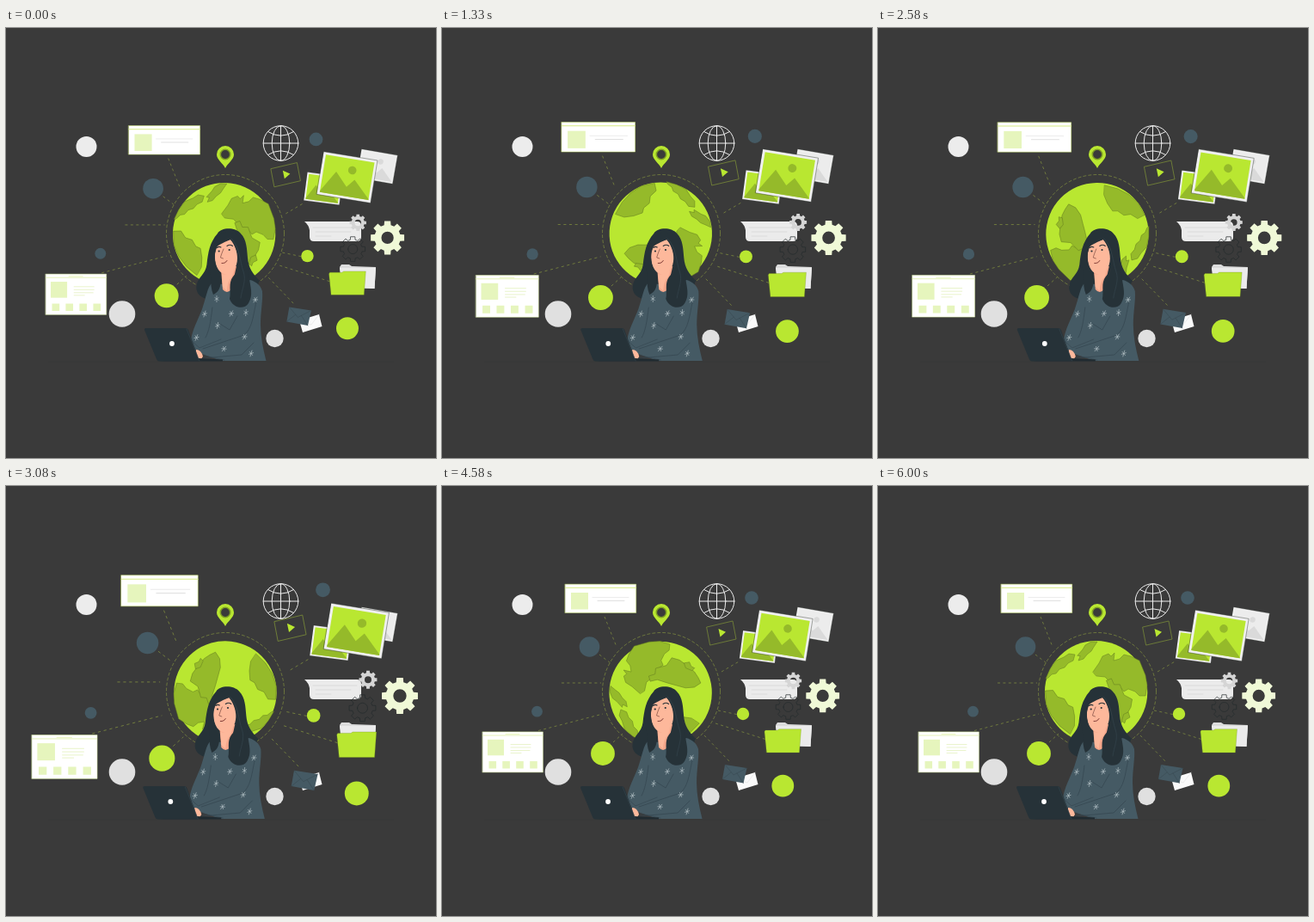
An HTML page for the animation above (6040 ms loop, 500 px wide and 500 px high).

```html
<!DOCTYPE html>
<html lang="en">
<head>
<meta charset="utf-8">
<title>Connected world</title>
<style>
  html, body { margin: 0; width: 100%; height: 100%; overflow: hidden; background: #3a3a3a; }
  svg { display: block; width: 100%; height: 100%; }
</style>
</head>
<body>
<svg viewBox="0 0 500 500" fill="none" stroke-linejoin="round" stroke-linecap="round">
  <path d="M50 388H450" stroke="#333638" stroke-width=".6"/>

  <!-- Dashed links -->
  <g id="links" stroke="#84923f" stroke-width=".7" stroke-dasharray="3 3.4" stroke-linecap="butt">
    <path d="M139 229H185M189 152L203 187M183 196L196 206M325 216L347 203M112 284.500L187 265
             M321 261L345 266M318 276L376 294.500M305 290L335 321M199 298L210 288"/>
  </g>
  <circle cx="255" cy="239" r="68.500" stroke="#84923f" stroke-width=".7" stroke-dasharray="3 3"/>

  <!-- Earth; each landmass is drawn at the turn where it is fully visible -->
  <g id="earth">
    <circle cx="253.600" cy="239.700" r="59.700" fill="#b9e731"/>
    <g id="land" fill="#95ba2a" stroke="#657f20" stroke-width=".5"></g>
  </g>

  <!-- Still items -->
  <g id="still">
    <circle cx="93.500" cy="138" r="12" fill="#ececec"/>
    <circle cx="135" cy="332.500" r="15.300" fill="#e0e0e0"/>
    <circle cx="312.500" cy="361" r="10.200" fill="#e0e0e0"/>
    <path d="M255 163C252 157 245 153 245 147A10 10 0 0 1 265 147C265 153 258 157 255 163Z" fill="#b9e731"/>
    <circle cx="255" cy="147" r="5.700" fill="#3a3a3a" stroke="#7f9f24" stroke-width="1.600"/>
    <g stroke="#ededed" stroke-width="1">
      <circle cx="319.500" cy="134" r="20.300"/>
      <ellipse cx="319.500" cy="134" rx="10.300" ry="20.300"/>
      <path d="M319.500 113.700V154.300M299.200 134H339.800M304.500 120.500Q319.500 130 334.500 120.500M304.500 147.500Q319.500 138 334.500 147.500"/>
    </g>
    <g id="greyPhoto"></g>
    <path d="M347 225H408Q413 225 413 230V243Q413 248 408 248H358Q353 248 353 243V235Q352 229 347 225Z" fill="#ebebeb"/>
    <path d="M357 232H408M360 237H401M360 242H378" stroke="#d4d4d4" stroke-width=".7"/>
    <path d="M388 278L390 275H399L402 277L430 278L428.500 303L392 302Z" fill="#dcdcdc"/>
    <path d="M388 279L430 279L428.500 303L390 301Z" fill="#ebebeb"/>
    <path d="M341 340L364 333L367.500 347L345 354Z" fill="#fafafa"/>
    <path d="M341 340L355 345L364 333" stroke="#dcdcdc" stroke-width=".5"/>
  </g>

  <!-- Pulsing items -->
  <g id="pulse">
    <g id="discs"></g>

    <rect x="143.200" y="114.200" width="82.500" height="33.300" fill="#fff" stroke="#c9e26d" stroke-width=".5"/>
    <path d="M143.500 118.300H225.500" stroke="#d6ec83" stroke-width="1"/>
    <rect x="150" y="124" width="20" height="19.500" fill="#e6f5bd"/>
    <path d="M175 129.500H217" stroke="#e4e4e4" stroke-width=".7"/>
    <path d="M181 133.500H212" stroke="#d4d4d4" stroke-width=".7"/>

    <rect x="47.200" y="285.900" width="70.200" height="47" fill="#fff" stroke="#d9eca0" stroke-width=".5"/>
    <path d="M47.500 290H117" stroke="#e2f1b2" stroke-width=".9"/>
    <path d="M74 288.500H90" stroke="#d6ec83" stroke-width=".5"/>
    <rect x="53" y="294.800" width="19" height="18.500" fill="#e6f5bd"/>
    <path d="M80 300.500H103M80 304H103M80 307.500H102M80 310.500H92" stroke="#dcecab" stroke-width=".6"/>
    <path d="M54.500 320h8.600v8.600h-8.600zM70.300 320h8.600v8.600h-8.600zM86.200 320h8.600v8.600h-8.600zM102.200 320h8.600v8.600h-8.600z" fill="#e6f5bd"/>

    <path d="M308 164L338 157L342 178L312 185Z" stroke="#809438" stroke-width=".7"/>
    <path d="M321.500 166L330 169.800L323.500 175.500Z" fill="#b9e731"/>

    <g id="greenPhotos"></g>
    <g id="gears"></g>

    <path d="M375 285.500L376 284H390L392 282.700H417.500L415.500 310H377.500Z" fill="#b9e731" stroke="#6f8b22" stroke-width=".3"/>
    <path d="M329 324L354.500 328L350.500 345.500L326 341Z" fill="#455a64"/>
    <path d="M329 324L339 336L354.500 328M326 341L336 333M350.500 345.500L343 334" stroke="#37474f" stroke-width=".5"/>
  </g>

  <!-- Woman with laptop -->
  <g id="woman">
    <path d="M246 239C250 232 266 231 273 239C280 246 280 257 281 267C282 279 287 286 295 294
             C291 300 294 307 288 314L240 315C229 317 220 309 221.500 300C223 289 232 287 233.500 275
             C235 261 237 249 246 239Z" fill="#263238"/>
    <path d="M240 296C234 301 233 313 228 327C223 340 217 350 215 363L222 377L251 387H302.500
             C299 373 296 359 296 345C296 330 299 316 298 306C296 299 291 295 284 293L263 300Z" fill="#455a64"/>
    <path d="M250 281L252 304Q257 310 262 304L268 277Z" fill="#f6a78b"/>
    <path d="M245 255C247 250 254 248 261 246C266 252 269 260 269 268C269 279 262 287 255 286.500
             C246 285 242 273 243 262Z" fill="#fdb89b"/>
    <path d="M254 286.500Q262 286 266 279L263 289Q257 296 257 306L252 301L251 286Z" fill="#fdb89b"/>
    <path d="M261 246C266 251 269 259 270 268C271 278 269 284 264 289C258 297 262 306 260 315
             C264 326 277 328 282 320C288 310 284 301 283 291C281 278 281 258 274 245
             C268 236 250 235 244 244C238 253 236 265 236 276C240 285 236 297 241 310
             C252 305 251 292 246 281C242 272 242 262 245 255C248 251 255 249 261 246Z" fill="#263238"/>
    <path d="M262 245C272 254 272 272 276 283S274 304 273 314" stroke="#37474f" stroke-width=".6"/>
    <path d="M245.500 255.500Q247.500 253.500 250 255M257 253.500Q260.500 251 263.500 253.500" stroke="#263238" stroke-width="1.100"/>
    <circle cx="247.700" cy="259.500" r="1.100" fill="#263238"/>
    <circle cx="259.700" cy="258" r="1.100" fill="#263238"/>
    <path d="M253 257Q250 264 249.500 267L252.500 268" stroke="#7a4a40" stroke-width=".7"/>
    <path d="M251 273.500Q255 274 257 270.500" stroke="#7d3934" stroke-width="1"/>

    <path d="M240 325C238 342 236 353 232 360M291 318C287 338 286 349 277 357L229 373
             M249 344L260 351L269 335M229 384L274 380L288 366" stroke="#34464f" stroke-width=".7"/>
    <path d="M215 363L225 372L250 362M230 381L254 386" stroke="#34464f" stroke-width=".6"/>
    <g id="stars" stroke="#c3cfd3" stroke-width=".55"></g>
    <path d="M221 374Q227 374 229 382L227 385L221 383Z" fill="#fdb89b"/>
    <path d="M222 384L252 385.500V387.500H177Z" fill="#202b31"/>
    <path d="M163 349H209Q211 349 212 351L225 387.500H178Q176 387.500 175 385L161 351Q160.500 349 163 349Z" fill="#263238"/>
    <path d="M210 350L225 387" stroke="#37474f" stroke-width=".6"/>
    <circle cx="193" cy="367" r="2.900" fill="#fff"/>
  </g>
</svg>

<script>
const LOOP = 6040, CYCLE = 6000, LEAD = 28;
const GREEN = '#b9e731', SHADE = '#95ba2a', SLATE = '#455a64';
const PIVOT = '254.300 239.800';
const $ = id => document.getElementById(id);
const add = (id, markup) => $(id).insertAdjacentHTML('beforeend', markup);

// [turn in degrees, outline]
const landmasses = [
  [0, 'M195 224L200 213L207 203L216 199L222 195L229 196L227 203L221 206L217 211L211 213L207 218L202 219L198 223Z'],
  [0, 'M232 197L238 190L241 185L248 181L255 181L251 187L248 192L243 196L239 201L233 203L235 198Z'],
  [0, 'M250 216L257 206L261 198L268 195L271 198L275 194L274 203L281 201L286 196L294 198L304 203L311 220L313 232L311 244L304 244L299 239L291 236L286 239L280 232L275 234L270 228L264 222L254 221Z'],
  [157, 'M264 183L279 187L292 194L303 204L310 218L302 222L294 217L286 218L279 213L273 213L267 204L263 194Z'],
  [220, 'M228 229L232 217L228 207L235 201L243 198L256 194L264 194L271 195L271 204L266 213L258 220L250 227L240 235L237 243L231 241L233 234Z'],
  [277, 'M282 206L288 205L290 210L294 212L291 215L284 212Z']
];
landmasses.forEach(([turn, d]) => add('land', `<path transform="rotate(${-turn} ${PIVOT})" d="${d}"/>`));

const disc = (x, y, r, fill) => `<circle cx="${x}" cy="${y}" r="${r}" fill="${fill}"/>`;
add('discs', disc(171.5, 187, 11.8, SLATE) + disc(360, 130, 7.8, SLATE) + disc(110.5, 262.2, 6.4, SLATE)
  + disc(350, 265, 7.2, GREEN) + disc(396.3, 348.7, 12.9, GREEN) + disc(187, 311, 13.9, GREEN));

function photo(x, y, w, turn, fill, hill) {
  const scale = w / 63;
  return `<g transform="translate(${x} ${y}) rotate(${turn}) scale(${scale})">
    <rect x="-31.500" y="-25" width="63" height="50" fill="#f0f0f0" stroke="#2f3630" stroke-width=".4"/>
    <rect x="-28.500" y="-22" width="57" height="44" fill="${fill}"/>
    <path d="M-28.500 20L-13.500 -4.500L1 11L9 1.500L28.500 21V22H-28.500Z" fill="${hill}"/>
    <circle cx="4.600" cy="-9" r="4.800" fill="${hill}"/></g>`;
}
add('greyPhoto', photo(431.5, 161, 42.5, 10, '#ececec', '#dadada'));
add('greenPhotos', photo(368.5, 187, 41.5, 7.5, GREEN, SHADE) + photo(396, 174, 63, 9.3, GREEN, SHADE));

function gear(x, y, r, hole, style) {
  const teeth = 8, step = 2 * Math.PI / teeth;
  let d = '';
  for (let i = 0; i < teeth; i++) {
    [[-.33, .77], [-.23, 1], [.23, 1], [.33, .77]].forEach(([offset, k]) => {
      const a = (i + offset) * step;
      d += `${d ? 'L' : 'M'}${(x + r * k * Math.cos(a)).toFixed(2)} ${(y + r * k * Math.sin(a)).toFixed(2)}`;
    });
  }
  d += `ZM${x - hole} ${y}a${hole} ${hole} 0 1 0 ${2 * hole} 0a${hole} ${hole} 0 1 0 ${-2 * hole} 0Z`;
  return `<path d="${d}" fill-rule="evenodd" ${style}/>`;
}
add('gears', gear(408.5, 226.5, 9.8, 3.7, 'fill="#d5d5d5"')
  + gear(402.5, 257, 14.5, 5.5, 'stroke="#252b2d" stroke-width=".7"')
  + gear(442.7, 243.9, 19.7, 7.1, 'fill="#f0f9d7"'));

const stars = [[245, 315], [231, 332.5], [290, 316], [246, 346], [262, 332], [279, 331],
  [221.5, 360], [253.5, 373], [285, 378.5], [277.5, 359]];
stars.forEach(([x, y], i) => add('stars',
  `<path transform="translate(${x} ${y}) rotate(${i * 17 % 40})" d="M0 -3.600V3.600M-2.200 -1.500L2.200 1.500M-2.200 1.500L2.200 -1.500"/>`));

// Linear interpolation through [fraction, value] keys
function track(keys, p) {
  const i = Math.max(1, keys.findIndex(k => k[0] >= p));
  const [p0, v0] = keys[i - 1], [p1, v1] = keys[i];
  return v0 + (v1 - v0) * (p - p0) / (p1 - p0);
}
const beat = [[0, 1], [.1, 1.1], [.3, 1], [.4, 1], [.5, 1.1], [.6, 1], [1, 1]];
const shake = [0, -1, 2, -4, 4, -4, 4, -4, 2, -1, 0].map((v, i) => [i / 10, v * .66]);

function draw(time) {
  const p = Math.min(time % LOOP + LEAD, CYCLE) / CYCLE;
  const zoom = `translate(256 242) scale(${track(beat, p)}) translate(-256 -242)`;
  $('pulse').setAttribute('transform', zoom);
  $('links').setAttribute('transform', zoom);
  $('earth').setAttribute('transform', `rotate(${p * 360} ${PIVOT})`);
  $('woman').setAttribute('transform', `translate(${track(shake, p)} 0)`);
}

const start = performance.now();
function tick() {
  draw(performance.now() - start);
  requestAnimationFrame(tick);
}
tick();
</script>
</body>
</html>
```
